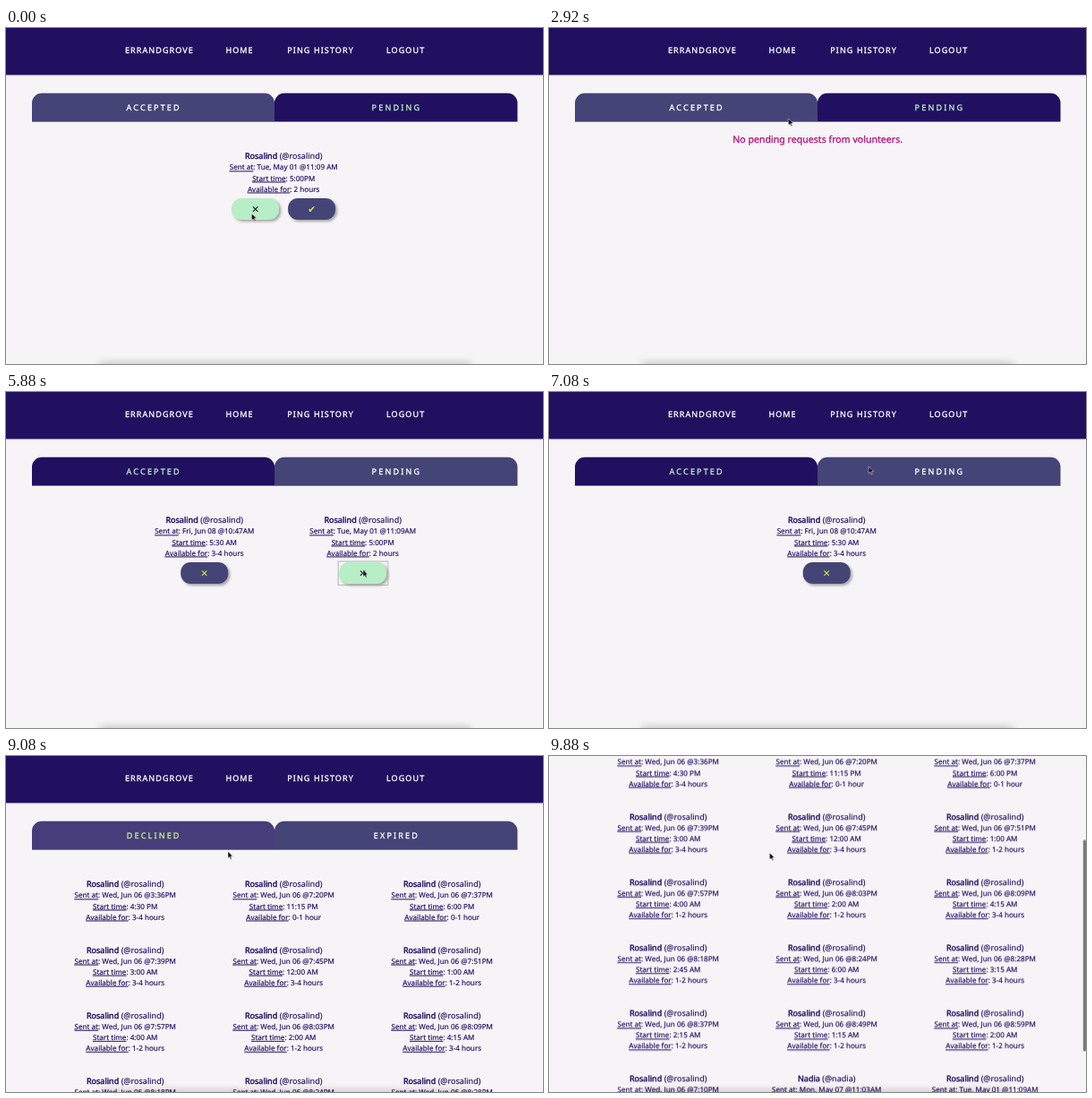
Write an HTML page that moves like this. It is 600x375 px and loops after 9920 ms.

```html
<!DOCTYPE html>
<html lang="en">
<head>
<meta charset="utf-8">
<title>Volunteer pings</title>
<style>
  :root {
    --navy: #21105f;
    --slate: #444477;
    --haze: #727299;
    --mint: #b8eec6;
    --lime: #d9f03c;
    --loop: 9920ms;
  }
  html, body { margin: 0; width: 100%; height: 100%; overflow: hidden; background: #f6f4f7; }
  svg { display: block; width: 100vw; height: 100vh; }
  text {
    font: 9.05px "Noto Sans", "Open Sans", sans-serif;
    text-rendering: geometricPrecision;
    white-space: pre;
  }

  #nav { filter: drop-shadow(0 .5px 1px #0003); }
  #nav text { fill: #fff; stroke: #fff; stroke-width: .3; letter-spacing: 1.08px; }
  #nav .hot { animation: linkText var(--loop) step-end infinite; }
  #underline { fill: var(--lime); animation: linkHover var(--loop) step-end infinite; }

  .tab text {
    fill: currentColor; stroke: currentColor; stroke-width: .3;
    letter-spacing: 2.15px; text-anchor: middle;
  }
  #left { animation: leftTab var(--loop) linear infinite; }
  #right { animation: rightTab var(--loop) step-end infinite; }

  .card text { fill: var(--navy); stroke: var(--navy); stroke-width: .16; text-anchor: middle; }
  .card .info { font-size: 8.12px; }
  .card .name { stroke-width: .42; }
  .label { text-decoration: underline; text-decoration-thickness: .6px; }
  .msg { font-size: 10.6px; fill: #b5157c; stroke: #b5157c; stroke-width: .32; text-anchor: middle; }

  .btn { fill: var(--slate); color: var(--lime); }
  .btn .face { filter: drop-shadow(2px 2px 1.5px #0005); }
  .btn text { font: 10.5px "DejaVu Sans", sans-serif; fill: currentColor; text-anchor: middle; }
  .focus { fill: none; stroke: #a5a5a8; stroke-width: .8; opacity: 0; }
  #skip { animation: skipHover var(--loop) step-end infinite; }
  #accept { animation: acceptHover var(--loop) step-end infinite; }
  #accept .focus { animation: acceptFocus var(--loop) step-end infinite; }
  #cancel { animation: cancelHover var(--loop) step-end infinite; }
  #cancel .focus { animation: cancelFocus var(--loop) step-end infinite; }

  .scene { opacity: 0; animation: var(--loop) step-end infinite; }
  #pending { animation-name: pending; }
  #noPending { animation-name: noPending; }
  #accepted { animation-name: accepted; }
  #remaining { animation-name: remaining; }
  #noDeclined { animation-name: noDeclined; }
  #declined { animation-name: declined; }
  .home { animation-name: home; }
  .history { animation-name: history; }

  #page { animation: scroll var(--loop) infinite; }
  #thumb { fill: #00000080; animation: thumb var(--loop) infinite, thumbShow var(--loop) step-end infinite; }
  #dock { filter: blur(4px); }
  #status { animation: status var(--loop) step-end infinite; }
  #status text { font: 6px "Liberation Sans", Arial, sans-serif; fill: #fff; }
  #cursor { animation: travel var(--loop) ease-in-out infinite; }
  #arrow { animation: arrow var(--loop) step-end infinite; }
  #hand { animation: hand var(--loop) step-end infinite; }

  @keyframes pending { 0% { opacity: 1 } 18.15%, to { opacity: 0 } }
  @keyframes noPending { 0% { opacity: 0 } 18.15% { opacity: 1 } 35.69%, to { opacity: 0 } }
  @keyframes accepted { 0% { opacity: 0 } 35.69% { opacity: 1 } 62.1%, to { opacity: 0 } }
  @keyframes remaining { 0% { opacity: 0 } 62.1% { opacity: 1 } 78.13%, to { opacity: 0 } }
  @keyframes noDeclined { 0% { opacity: 0 } 78.13% { opacity: 1 } 83.17%, to { opacity: 0 } }
  @keyframes declined { 0% { opacity: 0 } 83.17%, to { opacity: 1 } }
  @keyframes home { 0% { opacity: 1 } 78.13%, to { opacity: 0 } }
  @keyframes history { 0% { opacity: 0 } 78.13%, to { opacity: 1 } }

  @keyframes leftTab {
    0%, 29.6% { fill: var(--slate); color: #fff }
    30.8%, 42.8% { fill: var(--haze); color: var(--lime) }
    44.4%, 88.7% { fill: var(--navy); color: var(--mint) }
    89.5%, 91% { fill: var(--haze); color: var(--lime) }
    92%, to { fill: var(--navy); color: var(--mint) }
  }
  @keyframes rightTab {
    0% { fill: var(--navy); color: var(--mint) }
    35.69%, to { fill: var(--slate); color: #fff }
  }

  @keyframes skipHover {
    0% { fill: var(--mint); color: #111 }
    4.6%, to { fill: var(--slate); color: var(--lime) }
  }
  @keyframes acceptHover {
    0% { fill: var(--slate); color: var(--lime) }
    5.2%, to { fill: var(--mint); color: #111 }
  }
  @keyframes acceptFocus { 0% { opacity: 0 } 15.12%, to { opacity: 1 } }
  @keyframes cancelHover {
    0% { fill: var(--slate); color: var(--lime) }
    47%, to { fill: var(--mint); color: #111 }
  }
  @keyframes cancelFocus { 0% { opacity: 0 } 57.66%, to { opacity: 1 } }

  @keyframes linkText {
    0% { fill: #fff; stroke: #fff }
    73% { fill: var(--mint); stroke: var(--mint) }
    87.5%, to { fill: #fff; stroke: #fff }
  }
  @keyframes linkHover { 0% { opacity: 0 } 73% { opacity: 1 } 87.5%, to { opacity: 0 } }
  @keyframes status { 0% { opacity: 0 } 73.8% { opacity: 1 } 88.5%, to { opacity: 0 } }

  /* quadratic ease-in */
  @keyframes scroll {
    0%, 95.968% { transform: none; animation-timing-function: cubic-bezier(.333, 0, .667, .333) }
    to { transform: translateY(-182.7px) }
  }
  @keyframes thumb {
    0%, 95.968% { transform: none; animation-timing-function: cubic-bezier(.333, 0, .667, .333) }
    to { transform: translateY(114.8px) }
  }
  @keyframes thumbShow { 0% { opacity: 0 } 95.968%, to { opacity: 1 } }

  @keyframes travel {
    0%, 2.52% { transform: translate(274.5px, 207px) }
    7.56%, 23.19% { transform: translate(340px, 206px) }
    29.44% { transform: translate(267.5px, 101px); animation-timing-function: ease-out }
    31.05%, 41.33% { transform: translate(266px, 87.5px) }
    48.39%, 68.55% { transform: translate(399px, 198.5px) }
    73.59% { transform: translate(330px, 8px) }
    75.4%, 85.18% { transform: translate(323px, 29px) }
    92.24%, to { transform: translate(246.5px, 108px) }
  }
  @keyframes arrow {
    0% { opacity: 1 } 29.8% { opacity: 0 } 42.9% { opacity: 1 } 73% { opacity: 0 }
    87.5% { opacity: 1 } 88.7% { opacity: 0 } 91.3%, to { opacity: 1 }
  }
  @keyframes hand {
    0% { opacity: 0 } 29.8% { opacity: 1 } 42.9% { opacity: 0 } 73% { opacity: 1 }
    87.5% { opacity: 0 } 88.7% { opacity: 1 } 91.3%, to { opacity: 0 }
  }
</style>
</head>
<body>
<svg viewBox="0 0 600 375">
  <g id="page">
    <g id="nav">
      <rect y="-10" width="600" height="62.4" fill="#21105f"/>
      <text x="132.9" y="27.8">ERRANDGROVE</text>
      <text x="245.4" y="27.8">HOME</text>
      <text x="314.2" y="27.8" class="hot">PING HISTORY</text>
      <text x="424.9" y="27.8">LOGOUT</text>
      <rect id="underline" x="295.7" y="50.4" width="110.6" height="2.6"/>
    </g>

    <g id="left" class="tab">
      <path d="M29 104.3V83.8a11 11 0 0 1 11-11H289a11 11 0 0 1 11 11V104.3Z"/>
      <text x="165.2" y="92.4" class="scene home">ACCEPTED</text>
      <text x="165.2" y="92.4" class="scene history">DECLINED</text>
    </g>
    <g id="right" class="tab">
      <path d="M300 104.3V83.8a11 11 0 0 1 11-11H560.5a11 11 0 0 1 11 11V104.3Z"/>
      <text x="436.4" y="92.4" class="scene home">PENDING</text>
      <text x="436.4" y="92.4" class="scene history">EXPIRED</text>
    </g>
    <rect x="29" y="104.1" width="542.5" height=".9" fill="#5f7d3a"/>

    <g id="pending" class="scene"></g>
    <text id="noPending" class="scene msg" x="300.2" y="127.6">No pending requests from volunteers.</text>
    <g id="accepted" class="scene"></g>
    <g id="remaining" class="scene"></g>
    <text id="noDeclined" class="scene msg" x="310.2" y="146.5">No volunteers declined yet!</text>
    <g id="declined" class="scene"></g>
  </g>

  <rect id="thumb" x="596.8" width="3.2" height="236" rx="1.5"/>
  <rect id="dock" x="104" y="373" width="415" height="20" opacity=".18"/>
  <g id="status">
    <rect y="366" width="200" height="9"/>
    <text x="1" y="372.6">localhost:3000/history</text>
  </g>
  <g id="cursor">
    <path id="arrow" d="M0 0V7.6L1.8 6l1.2 2.8 1.3-.5L3.1 5.5H5.5Z" stroke="#fff" stroke-width=".5"/>
    <path id="hand" d="M-.8.8a.8.8 0 0 1 1.6 0V3.6l3 .7q1 .3.8 1.4L4 9.2H-.2L-3 5.8q-.2-1 .8-.8l1.4.9Z"
      fill="#fff" stroke="#111" stroke-width=".7" stroke-linejoin="round"/>
  </g>
</svg>

<script>
  const MID = 310.2, GAP = 177, TOP = 146.4, ROW = 73.2;
  const people = { r: ["Rosalind", "@rosalind"], n: ["Nadia", "@nadia"] };

  const button = (x, glyph, id = "") => `
    <g class="btn" ${id && `id="${id}"`} transform="translate(${x} 55.6)">
      <rect class="face" x="-26.5" y="-12" width="53" height="24" rx="11"/>
      <text y="3.8">${glyph}</text>
      <rect class="focus" x="-27.5" y="-13" width="55.5" height="26.5"/>
    </g>`;

  const info = (y, label, value) =>
    `<text class="info" y="${y}"><tspan class="label">${label}</tspan>: ${value}</text>`;

  const card = (x, y, sent, start, span, buttons = "", who = "r") => {
    const [name, handle] = people[who];
    return `<g class="card" transform="translate(${x} ${y})">
      <text><tspan class="name">${name}</tspan> (${handle})</text>
      ${info(12.1, "Sent at", sent)}
      ${info(24.2, "Start time", start)}
      ${info(36.2, "Available for", span)}
    </g><g transform="translate(${x} ${y})">${buttons}</g>`;
  };

  const fill = (id, html) => { document.getElementById(id).innerHTML = html; };
  const june = x => card(x, TOP, "Fri, Jun 08 @10:47AM", "5:30 AM", "3-4 hours", button(0, "✕"));

  fill("pending", card(MID, TOP, "Tue, May 01 @11:09 AM", "5:00PM", "2 hours",
    button(-31.6, "✕", "skip") + button(31.4, "✔", "accept")));
  fill("accepted", june(MID - GAP / 2) +
    card(MID + GAP / 2, TOP, "Tue, May 01 @11:09AM", "5:00PM", "2 hours", button(0, "✕", "cancel")));
  fill("remaining", june(MID));

  // sent | start | hours; a bare time means Wed, Jun 06
  const pings = `3:36PM|4:30 PM|3-4 hours
7:20PM|11:15 PM|0-1 hour
7:37PM|6:00 PM|0-1 hour
7:39PM|3:00 AM|3-4 hours
7:45PM|12:00 AM|3-4 hours
7:51PM|1:00 AM|1-2 hours
7:57PM|4:00 AM|1-2 hours
8:03PM|2:00 AM|1-2 hours
8:09PM|4:15 AM|3-4 hours
8:18PM|2:45 AM|1-2 hours
8:24PM|6:00 AM|3-4 hours
8:28PM|3:15 AM|3-4 hours
8:37PM|2:15 AM|1-2 hours
8:49PM|1:15 AM|1-2 hours
8:59PM|2:00 AM|1-2 hours
7:10PM|5:00 PM|1-2 hours
Mon, May 07 @11:03AM|5:00 PM|2 hours|n
Tue, May 01 @11:09AM|5:00PM|2 hours`;

  fill("declined", pings.split("\n").map((line, i) => {
    const [sent, start, span, who] = line.split("|");
    const date = sent.includes("@") ? sent : "Wed, Jun 06 @" + sent;
    return card(MID + (i % 3 - 1) * GAP, TOP + Math.floor(i / 3) * ROW, date, start, span, "", who);
  }).join(""));
</script>
</body>
</html>
```
